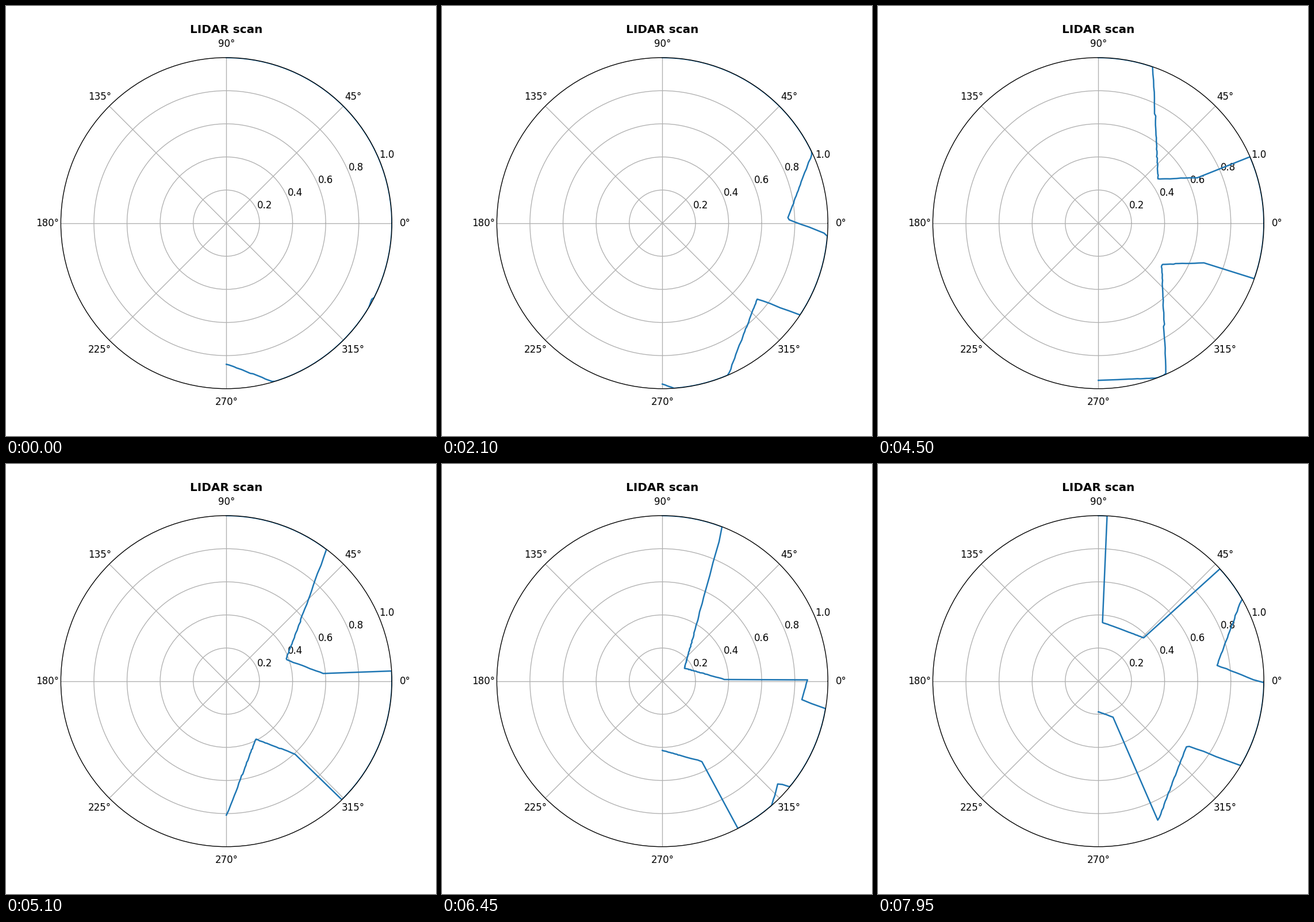
Recreate the animation shown at these times as a matplotlib script. Size 748 px wide and 748 px high, loop 8000 ms.

```python
import numpy as np
import matplotlib.pyplot as plt
from matplotlib.animation import FuncAnimation

SIZE, DPI = 748, 120
LOOP_MS, TICK_MS, SCAN_MS = 8000, 50, 150

# World in pixel units, y pointing down
START_Y, START_SPEED, START_TILT = 244, -9, 45
FLAP_SPEED, MAX_SPEED, TILT_STEP, MAX_TILT = -9, 10, 3, 20
FLAPS = (14, 33, 53)
SENSOR_X, SENSOR_DY = 91, 12
MAX_RANGE, RAYS = 196, 180
GROUND_Y = 404
PIPE_STARTS, PIPE_SPEED = (288, 432, 576), 4
PIPE_W, PIPE_H, GAP_TOP, GAP = 52, 320, 170, 100


def pose(step):
    """Height and tilt of the flyer after the given step."""
    y, speed, tilt = START_Y, START_SPEED, START_TILT
    for k in range(step + 1):
        if k in FLAPS:
            speed, tilt = FLAP_SPEED, START_TILT
        else:
            speed = min(speed + 1, MAX_SPEED)
            tilt = max(tilt - TILT_STEP, -90)
        y += speed
    return y, min(tilt, MAX_TILT)


def obstacles(step):
    """Ground and pipes as (left, top, right, bottom), inclusive."""
    rects = [(0, GROUND_Y, 335, GROUND_Y + 111)]
    for start in PIPE_STARTS:
        x = start - PIPE_SPEED * (step + 1)
        for top in (GAP_TOP - PIPE_H, GAP_TOP + GAP):
            rects.append((x, top, x + PIPE_W - 1, top + PIPE_H - 1))
    return rects


def outcode(x, y, rect):
    left, top, right, bottom = rect
    side = 4 if x < left else 8 if x > right else 0
    return side | (1 if y < top else 2 if y > bottom else 0)


def first_hit(x, y, x2, y2, rect):
    """Integer Cohen-Sutherland clipping of the near end of a ray."""
    left, top, right, bottom = rect
    far = outcode(x2, y2, rect)
    while code := outcode(x, y, rect):
        if code & far:
            return None
        if code & 3:
            edge = top if code & 1 else bottom
            x, y = x + int((x2 - x) * (edge - y) / (y2 - y)), edge
        else:
            edge = left if code & 4 else right
            x, y = edge, y + int((y2 - y) * (edge - x) / (x2 - x))
    return x, y


def scan(step):
    y, tilt = pose(step)
    y += SENSOR_DY
    rects = obstacles(step)
    ranges = np.full(RAYS, float(MAX_RANGE))
    for i in range(RAYS):
        angle = np.radians(i - 90 - tilt)
        end_x = int(SENSOR_X + MAX_RANGE * np.cos(angle))
        end_y = int(y + MAX_RANGE * np.sin(angle))
        for rect in rects:
            hit = first_hit(SENSOR_X, y, end_x, end_y, rect)
            if hit:
                dist = np.hypot(hit[0] - SENSOR_X, hit[1] - y)
                ranges[i] = min(ranges[i], dist)
    return ranges / MAX_RANGE


scans = [scan(k) for k in range(-(-LOOP_MS // SCAN_MS))]

fig = plt.figure(figsize=(SIZE / DPI, SIZE / DPI), dpi=DPI)
ax = fig.add_subplot(projection="polar")
ax.set_title("LIDAR scan", fontweight="bold")
ax.set_ylim(0, 1)
ax.set_yticks([0.2, 0.4, 0.6, 0.8, 1.0])
line, = ax.plot(np.linspace(np.pi / 2, -np.pi / 2, RAYS), scans[0])


def update(frame):
    line.set_ydata(scans[frame * TICK_MS // SCAN_MS])
    return line,


anim = FuncAnimation(fig, update, frames=LOOP_MS // TICK_MS,
                     interval=TICK_MS, repeat=True, repeat_delay=0)
plt.show()
```
